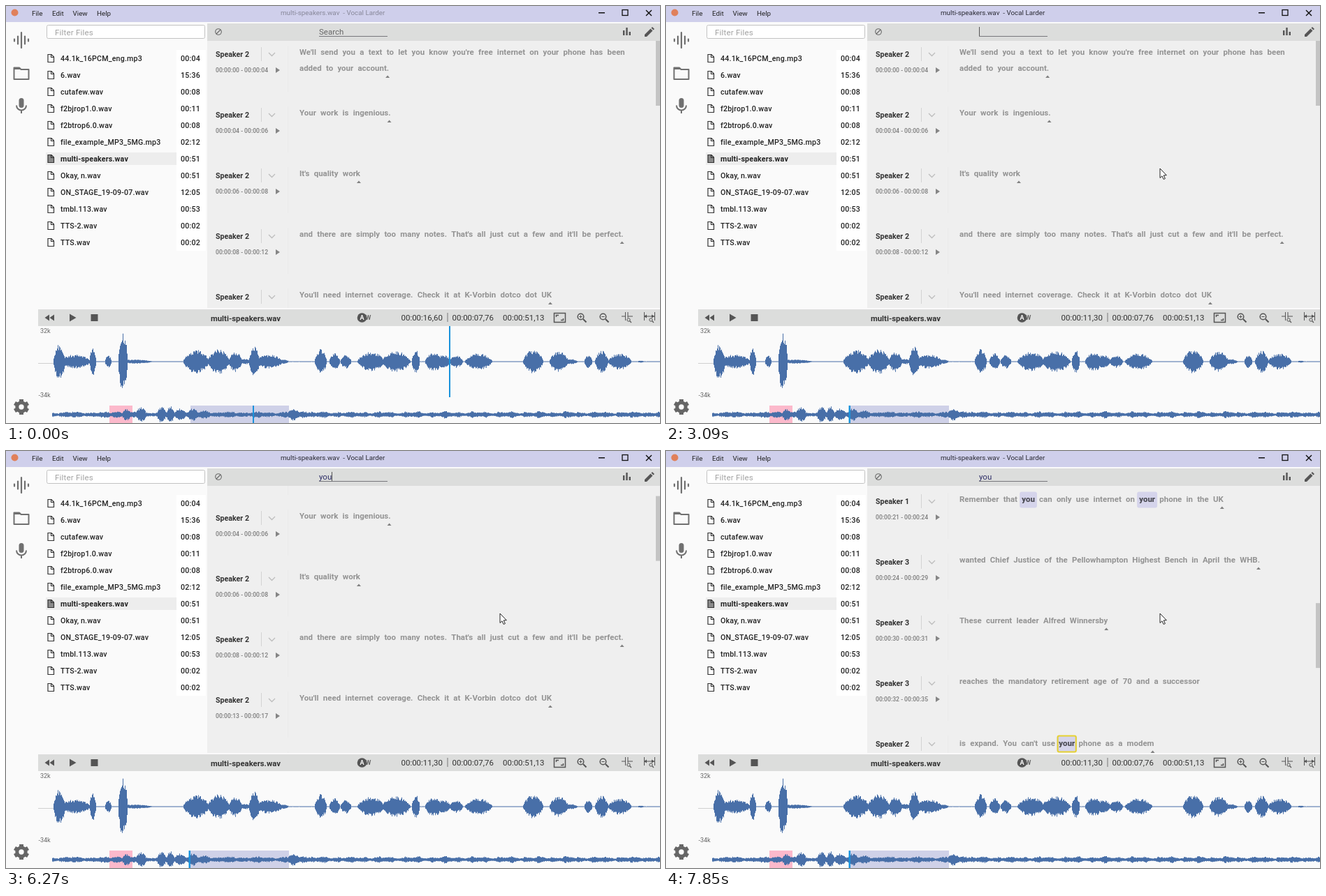
Write an HTML page with a canvas that moves like this. It is 936 px wide and 598 px high and loops after 8 s.

```html
<!DOCTYPE html>
<html lang="en">
<head>
<meta charset="utf-8">
<title>Transcript search</title>
<style>
  html, body { margin: 0; width: 100%; height: 100%; overflow: hidden; background: #fafafa; }
  canvas { display: block; }
</style>
</head>
<body>
<canvas id="stage" width="936" height="598"></canvas>
<script>
const ctx = document.getElementById('stage').getContext('2d');
const LOOP = 8000, PITCH = 86.9, GAP = 6.25;
const FACE = 'Roboto, "Open Sans", sans-serif';

const files = [
  ['44.1k_16PCM_eng.mp3', '00:04'], ['6.wav', '15:36'], ['cutafew.wav', '00:08'],
  ['f2bjrop1.0.wav', '00:11'], ['f2btrop6.0.wav', '00:08'], ['file_example_MP3_5MG.mp3', '02:12'],
  ['multi-speakers.wav', '00:51'], ['Okay, n.wav', '00:51'], ['ON_STAGE_19-09-07.wav', '12:05'],
  ['tmbl.113.wav', '00:53'], ['TTS-2.wav', '00:02'], ['TTS.wav', '00:02']
];

// speaker, start, end, lines, end marker
const rows = [
  [2, '00', '04', ["We'll send you a text to let you know you're free internet on your phone has been", 'added to your account.'], 1],
  [2, '04', '06', ['Your work is ingenious.'], 1],
  [2, '06', '08', ["It's quality work"], 1],
  [2, '08', '12', ["and there are simply too many notes. That's all just cut a few and it'll be perfect."], 1],
  [2, '13', '17', ["You'll need internet coverage. Check it at K-Vorbin dotco dot UK"], 1],
  [2, '17', '17', ['forward'], 0],
  [1, '17', '19', ['slash Street check'], 1],
  [1, '19', '20', ['low battery.'], 1],
  [1, '21', '24', ['Remember that you can only use internet on your phone in the UK'], 1],
  [3, '24', '29', ['wanted Chief Justice of the Pellowhampton Highest Bench in April the WHB.'], 1],
  [3, '30', '31', ['These current leader Alfred Winnersby'], 1],
  [3, '32', '35', ['reaches the mandatory retirement age of 70 and a successor'], 0],
  [2, '35', '38', ["is expand. You can't use your phone as a modem"], 1]
];

// center, half width, amplitude
const speech = [
  [76, 9, 25], [98, 24, 10], [124, 5, 21], [146, 5, 9], [167, 7, 43], [184, 26, 3],
  [272, 19, 17], [304, 16, 18], [328, 10, 15], [342, 8, 4], [355, 8, 22], [376, 21, 10], [396, 9, 3],
  [450, 9, 18], [470, 8, 12], [486, 8, 10], [522, 20, 14], [558, 21, 15], [586, 6, 17],
  [612, 13, 14], [626, 10, 10], [644, 10, 9], [676, 20, 12],
  [754, 15, 17], [791, 14, 15], [808, 10, 4], [833, 6, 9], [852, 10, 16], [878, 17, 12], [908, 5, 1.5]
];
const bursts = [
  [158, 9, 5], [172, 7, 9], [193, 8, 11], [222, 7, 12], [235, 6, 12], [249, 9, 9],
  [267, 9, 9], [284, 10, 6], [411, 9, 9], [425, 10, 5]
];

function random(seed) {
  return () => (seed = (seed * 16807) % 2147483647) / 2147483647;
}

function wavePath(x0, cy, bumps, floor, seed) {
  const rnd = random(seed), path = new Path2D();
  for (let x = x0; x < 936; x++) {
    let amp = floor(x);
    for (const [c, w, a] of bumps) {
      const d = (x - c) / w;
      if (Math.abs(d) < 1) amp = Math.max(amp, a * (1 - d * d) ** 0.8);
    }
    const up = amp * (0.62 + 0.38 * rnd()), down = amp * (0.62 + 0.38 * rnd());
    path.rect(x, cy - up, 1, up + down);
  }
  return path;
}
const mainWave = wavePath(68, 510, speech, () => 0.6, 77);
const miniWave = wavePath(66, 586, bursts,
  x => 3.2 + 1.3 * Math.sin(x / 4.3) * Math.sin(x / 11 + 1) + (x % 19 < 4 ? 1 : 0), 1234);

function box(x, y, w, h, color) {
  ctx.fillStyle = color;
  ctx.fillRect(x, y, w, h);
}
function font(size, weight = 400, spacing = 0) {
  ctx.font = `${weight} ${size}px ${FACE}`;
  ctx.letterSpacing = spacing + 'px';
}
function text(s, x, y, color) {
  ctx.fillStyle = color;
  ctx.fillText(s, x, y);
}
function line(color, width, ...pts) {
  ctx.strokeStyle = color;
  ctx.lineWidth = width;
  ctx.beginPath();
  for (let i = 0; i < pts.length; i += 2) ctx.lineTo(pts[i], pts[i + 1]);
  ctx.stroke();
}
function poly(color, ...pts) {
  ctx.fillStyle = color;
  ctx.beginPath();
  for (let i = 0; i < pts.length; i += 2) ctx.lineTo(pts[i], pts[i + 1]);
  ctx.fill();
}
function round(x, y, w, h, r) {
  ctx.beginPath();
  ctx.roundRect(x, y, w, h, r);
}
function disc(x, y, r, color) {
  ctx.fillStyle = color;
  ctx.beginPath();
  ctx.arc(x, y, r, 0, 7);
  ctx.fill();
}
function ring(x, y, r, color, width) {
  ctx.strokeStyle = color;
  ctx.lineWidth = width;
  ctx.beginPath();
  ctx.arc(x, y, r, 0, 7);
  ctx.stroke();
}

const clamp = v => Math.max(0, Math.min(1, v));
const ease = p => (1 - Math.cos(Math.PI * p)) / 2;
// the last value whose start time has passed
function at(t, track) {
  let v = track[0][1];
  for (const [start, value] of track) if (t >= start) v = value;
  return v;
}
function glide(t, first, step, start, span) {
  if (t < first) return 0;
  const q = first + Math.floor((t - first) / step) * step;
  return ease(clamp((q - start) / span));
}

const typed = [[0, ''], [2400, 'o'], [2870, ''], [3320, 'y'], [3630, 'yo'], [3950, 'you']];
const query = [[0, ''], [2400, 'o'], [3090, ''], [3320, 'y'], [3950, 'you']];
const glow = [[0, 0], [2400, 0.5], [2500, 1], [2870, 0.7], [2940, 0.4], [3010, 0.2], [3090, 0],
  [3320, 0.5], [3400, 1], [3630, 0.55], [3705, 0.8], [3780, 1]];
const picked = [[0, -1], [5110, 1], [5420, 2], [5730, 3], [5960, 4], [6190, 5], [6980, 6], [7450, 7]];
const caret = [[0, 0], [940, 1], [1390, 0], [1930, 1], [4500, 0], [4960, 1], [5500, 0], [6040, 1],
  [6580, 0], [7120, 1], [7650, 0]];

function titleBar(active) {
  box(0, 0, 936, 23, '#cfcfeb');
  disc(12.5, 9.5, 5, '#e0805a');
  font(9.84);
  [['File', 37], ['Edit', 66], ['View', 95.5], ['Help', 130]].forEach(([s, x]) => text(s, x, 13.5, '#222'));
  text('multi-speakers.wav  - Vocal Larder', 393, 13, active ? '#2b2b35' : '#88889a');
  box(848, 9, 9, 1.5, '#111');
  ctx.strokeStyle = '#111';
  ctx.lineWidth = 1.3;
  ctx.strokeRect(882, 5.5, 8, 8);
  line('#111', 1.4, 916, 6, 924, 14);
  line('#111', 1.4, 924, 6, 916, 14);
}

function sideBar() {
  const c = '#707070';
  ctx.lineCap = 'round';
  [[12, 1.5], [17, 5.5], [22, 11], [27, 5.5], [32, 1.5]].forEach(([x, h]) => line(c, 2.2, x, 49 - h, x, 49 + h));
  ctx.lineCap = 'butt';
  ctx.lineJoin = 'round';
  line(c, 2, 12, 88.5, 19, 88.5, 21.5, 91, 32.5, 91, 32.5, 105, 11.5, 105, 11.5, 88.5, 13, 88.5);
  ctx.lineJoin = 'miter';
  poly(c, 12, 88, 19.5, 88, 22, 91, 12, 91);
  ctx.fillStyle = c;
  round(18.5, 132, 7, 14, 3.5);
  ctx.fill();
  ctx.strokeStyle = c;
  ctx.lineWidth = 2;
  ctx.beginPath();
  ctx.arc(22, 142.5, 7, 0, Math.PI);
  ctx.stroke();
  box(21, 149, 2, 5, c);
  ring(22, 575, 6.2, '#666', 5);
  for (let i = 0; i < 6; i++) {
    const a = i * Math.PI / 3 + Math.PI / 2, x = Math.cos(a), y = Math.sin(a);
    line('#666', 6, 22 + 7 * x, 575 + 7 * y, 22 + 11 * x, 575 + 11 * y);
  }
}

function fileList() {
  ctx.strokeStyle = '#c2c2c2';
  ctx.lineWidth = 1;
  round(58.5, 27.5, 226, 19, 2);
  ctx.fillStyle = '#fff';
  ctx.fill();
  ctx.stroke();
  font(11.48, 400, 0.2);
  text('Filter Files', 70, 41.5, '#a2a2a2');
  box(244, 63, 42, 288, '#fff');
  box(57, 210, 187, 18, '#ededed');
  files.forEach(([name, length], i) => {
    const y = 75 + i * 24, bold = i === 6;
    ctx.beginPath();
    [[60, -5.5], [65, -5.5], [68.5, -2], [68.5, 5.5], [60, 5.5]].forEach(([x, d]) => ctx.lineTo(x, y + d));
    ctx.closePath();
    ctx.fillStyle = bold ? '#8a8a8a' : '#fff';
    ctx.fill();
    ctx.strokeStyle = '#333';
    ctx.lineWidth = 1.2;
    ctx.stroke();
    line('#333', 1.1, 64.5, y - 5.5, 64.5, y - 1.5, 68.5, y - 1.5);
    font(10.66, bold ? 700 : 500, bold ? 0.15 : 0.18);
    text(name, 78, y + 4, '#222');
    font(10.66, 500, 0.2);
    text(length, 250, y + 4, '#222');
  });
}

function searchBar(t) {
  const focused = t >= 940, red = focused && t < 2870, s = at(t, typed);
  box(288, 25, 648, 25, '#dcdddc');
  ring(304, 37, 4.3, '#666', 1.1);
  line('#666', 1.1, 301, 40, 307, 34);
  font(11.48);
  if (t < 1390) text('Search', 448, 40.5, '#666');
  text(s, 448, 40.5, '#2c2c66');
  box(448, 43, 98, 1, red ? '#d8463c' : '#77777c');
  if (at(t, caret)) box(Math.round(448 + ctx.measureText(s).width), 30, 1, 13, red ? '#d8463c' : '#555');
  box(883, 35, 2.4, 7, '#555');
  box(887.3, 31, 2.4, 11, '#555');
  box(891.6, 37, 2.4, 5, '#555');
  poly('#555', 914, 44, 914, 41, 922.5, 32.5, 925.5, 35.5, 917, 44);
  poly('#555', 923.5, 31.5, 925, 30, 928, 33, 926.5, 34.5);
}

function transcript(t) {
  const scroll = 344 * glide(t, 6190, 78, 6150, 430) + 348 * glide(t, 7450, 80, 7415, 435);
  const q = at(t, query), alpha = at(t, glow), pick = at(t, picked);
  let match = 0;
  box(288, 50, 648, 383, '#efefef');
  ctx.save();
  ctx.beginPath();
  ctx.rect(288, 50, 648, 383);
  ctx.clip();
  rows.forEach(([who, from, to, lines, mark], i) => {
    const y = Math.round(69 + i * PITCH - scroll);
    font(10.66, 700);
    text('Speaker ' + who, 300, y + 4, '#333');
    box(365, y - 10, 1, 20, '#d3d3d3');
    line('#bdbdbd', 1.3, 376, y - 2, 380.5, y + 2.5, 385, y - 2);
    font(8.65, 500);
    text(`00:00:${from} - 00:00:${to}`, 300, y + 26, '#7c7c7c');
    poly('#858585', 386, y + 19, 392, y + 23, 386, y + 27);
    box(403, y - 12, 1, 66, '#eaeaea');
    let base = y + 1, end = 0;
    font(11.48, 700);
    for (const s of lines) {
      const words = [];
      let x = 420, ringed = false;
      for (const word of s.split(' ')) {
        const w = ctx.measureText(word).width, hit = q !== '' && word.includes(q);
        const on = hit && match === pick;
        if (hit) match++;
        if (on) { ringed = true; x -= 0.75; }
        words.push({ word, x, w, hit, on });
        end = x + w;
        x = end + GAP - (on ? 0.75 : 0);
      }
      if (ringed) base += 2;
      for (const { word, x, w, hit, on } of words) {
        if (hit) {
          ctx.globalAlpha = alpha;
          ctx.fillStyle = '#d5d4eb';
          round(x - 3.1, base - 14.5, w + 6.2, 23, 3);
          ctx.fill();
          if (on) {
            ctx.strokeStyle = '#e6d130';
            ctx.lineWidth = 2;
            round(x - 1.7, base - 14.5, w + 3.4, 23, 2);
            ctx.stroke();
          }
          ctx.globalAlpha = 1;
        }
        text(word, x, base, '#939393');
        if (hit) {
          ctx.globalAlpha = alpha;
          text(word, x, base, '#4c4c58');
          ctx.globalAlpha = 1;
        }
      }
      base += 23;
    }
    const my = base - 23 + 7;
    if (mark) poly('#808080', end - 5, my + 3, end - 2, my - 0.5, end + 1, my + 3);
  });
  ctx.restore();
  box(930, 50 + scroll * 0.243, 6, 93, '#c4c4c4');
}

function lens(x, y, sign) {
  ring(x - 1.5, y - 1.5, 4.3, '#555', 1.5);
  line('#555', 2, x + 2, y + 2, x + 6.5, y + 6.5);
  line('#555', 1, x - 3.7, y - 1.5, x + 0.7, y - 1.5);
  if (sign > 0) line('#555', 1, x - 1.5, y - 3.7, x - 1.5, y + 0.7);
}

function transport(back) {
  const c = '#555';
  box(46, 435, 890, 24, '#dcdddc');
  poly(c, 62, 442.5, 62, 451.5, 55.5, 447);
  poly(c, 69, 442.5, 69, 451.5, 62.5, 447);
  poly(c, 91, 441.5, 100.5, 447, 91, 452.5);
  box(121.5, 442, 10, 10, c);
  font(11.3, 700);
  text('multi-speakers.wav', 293, 451.5, '#333');
  disc(509.5, 447, 6.8, c);
  font(9, 700);
  text('A', 506.5, 450.3, '#fff');
  text('W', 514.5, 450.3, '#666');
  font(11.48);
  text(back ? '00:00:11,30' : '00:00:16,60', 565.5, 450.5, '#333');
  box(631.5, 440, 1, 13, '#777');
  text('00:00:07,76', 638.5, 450.5, '#333');
  text('00:00:51,13', 711, 450.5, '#333');
  ctx.strokeStyle = c;
  ctx.lineWidth = 1.5;
  ctx.strokeRect(784.5, 440.5, 16, 13);
  line(c, 1.4, 787.5, 446, 787.5, 443.5, 791, 443.5);
  line(c, 1.4, 797.5, 448, 797.5, 450.5, 794, 450.5);
  lens(824, 447, 1);
  lens(856, 447, -1);
  line(c, 1, 881, 445, 887, 445);
  line(c, 1, 890, 445, 897, 445);
  box(886, 439, 1, 12, c);
  box(889.5, 439, 1, 8, c);
  ring(891, 450, 2.2, c, 1);
  line(c, 1.2, 892.5, 451.5, 895, 454);
  line(c, 1, 913, 445, 928, 445);
  box(913, 439, 1, 12, c);
  box(928, 439, 1, 12, c);
  poly(c, 913, 445, 917, 442.5, 917, 447.5);
  poly(c, 928, 445, 924, 442.5, 924, 447.5);
  ring(923, 450, 2.2, c, 1);
  line(c, 1.2, 924.5, 451.5, 927, 454);
}

function waves(back) {
  const blue = '#486fa8', head = '#1a93dc';
  font(9);
  text('32k', 49, 469, '#666');
  text('-34k', 46.5, 560.5, '#666');
  box(46, 512, 22, 1, '#d0d0d0');
  ctx.fillStyle = blue;
  ctx.fill(mainWave);
  box(148, 573, 33, 25, '#fcb9cb');
  box(264, 573, 141, 25, '#cfd1e8');
  ctx.fillStyle = blue;
  ctx.fill(miniWave);
  if (!back) box(634, 459, 2, 102, head);
  box(back ? 261.5 : 353, 573, back ? 2.5 : 2, 25, head);
}

function pointer(t) {
  if (t < 320) return;
  const p = Math.min(1, Math.floor((t - 320) / 77.5) / 8), k = 1 - (1 - p) ** 2;
  const x = 861 - 154 * k, y = 580 - 347 * k;
  ctx.beginPath();
  [[0, 0], [0, 13.5], [3, 10.8], [5.2, 15.5], [7.4, 14.5], [5.2, 9.9], [9.3, 9.7]]
    .forEach(([a, b]) => ctx.lineTo(x + a, y + b));
  ctx.closePath();
  ctx.fillStyle = '#fff';
  ctx.fill();
  ctx.strokeStyle = '#222';
  ctx.lineWidth = 1;
  ctx.stroke();
}

function draw(t) {
  const active = t >= 780;
  box(0, 0, 936, 598, '#fafafa');
  titleBar(active);
  sideBar();
  fileList();
  searchBar(t);
  transcript(t);
  transport(active);
  waves(active);
  pointer(t);
}

const begun = performance.now();
function tick() {
  draw((performance.now() - begun) % LOOP);
  requestAnimationFrame(tick);
}
tick();
</script>
</body>
</html>
```
